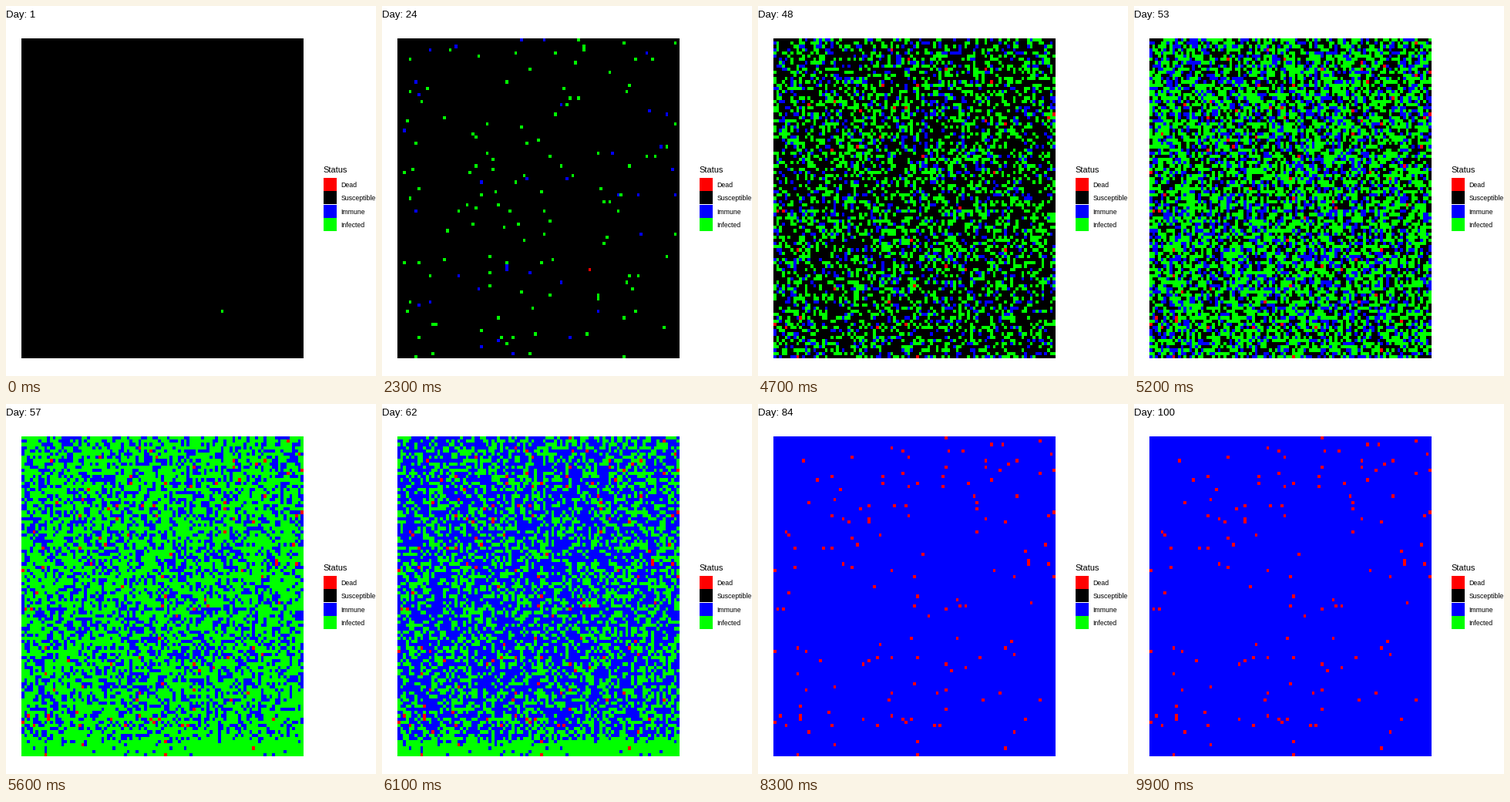
Recreate the animation shown at these times as a matplotlib script. Size 480 by 480 pixels, loop 10000 ms.

```python
import matplotlib.pyplot as plt
import numpy as np
from matplotlib.animation import FuncAnimation
from matplotlib.patches import Rectangle

N = 99              # cells per side
DAYS = 100
ILL_DAYS = 10
LAST_DAY = 57       # nobody is susceptible from here on
DEATH_RATE = 0.017
START = 84 * N + 70

SUSCEPTIBLE, INFECTED, IMMUNE, DEAD = range(4)
COLORS = np.array([(0, 0, 0), (0, 255, 0), (0, 0, 255), (255, 0, 0)], np.uint8)

rng = np.random.default_rng(7)


def total_cases():
    """Cases so far on each day: exponential growth between a few days."""
    days = np.arange(1, LAST_DAY + 1)
    knots = [1, 14, 24, 30, 38, 48, LAST_DAY]
    totals = [1, 36, 154, 430, 1150, 3950, N * N]
    return np.round(np.exp(np.interp(days, knots, np.log(totals))))


def epidemic():
    """Day of infection and day of death for every cell."""
    order = rng.permutation(N * N)
    order = np.append(START, order[order != START])
    infected = np.empty(N * N, int)
    infected[order] = np.searchsorted(total_cases(), np.arange(1, N * N + 1)) + 1

    dies = rng.random(N * N) < DEATH_RATE
    dies[START] = False
    lag = rng.integers(1, 7, N * N)
    died = np.where(dies, infected + lag, DAYS + 1)
    return infected.reshape(N, N), died.reshape(N, N)


infected, died = epidemic()

# a second wave hits the bottom rows on the last day of infections
chance = np.interp(np.arange(N), [92, 95], [0, 0.9])
relapsed = rng.random((N, N)) < chance[:, None]


def grid(day):
    state = np.full((N, N), SUSCEPTIBLE)
    state[day >= infected] = INFECTED
    state[day >= infected + ILL_DAYS] = IMMUNE
    if LAST_DAY <= day < LAST_DAY + ILL_DAYS:
        state[relapsed] = INFECTED
    state[day >= died] = DEAD
    return COLORS[state]


plt.rcParams["font.family"] = "Liberation Sans"
fig = plt.figure(figsize=(6, 6), dpi=80, facecolor="white")
ax = fig.add_axes([0, 0, 1, 1])


def label(x, y, text, px):
    return ax.text(x, y, text, fontsize=px * 72 / 80, color="black",
                   ha="left", va="baseline")


image = ax.imshow(grid(1), extent=(20, 386, 457, 42), interpolation="nearest",
                  aspect="auto")
title = label(0, 15, "Day: 1", 13.2)

label(411.4, 216, "Status", 11)
LEGEND = [("Dead", DEAD, 223), ("Susceptible", SUSCEPTIBLE, 240),
          ("Immune", IMMUNE, 258), ("Infected", INFECTED, 275)]
for name, state, top in LEGEND:
    ax.add_patch(Rectangle((412, top), 17, 17, lw=0, antialiased=False,
                           facecolor=COLORS[state] / 255))
    label(434.2, top + 12, name, 8.8)

ax.set_xlim(0, 480)
ax.set_ylim(480, 0)
ax.axis("off")


def update(i):
    image.set_data(grid(i + 1))
    title.set_text(f"Day: {i + 1}")
    return image, title


anim = FuncAnimation(fig, update, frames=DAYS, interval=100, repeat=True,
                     repeat_delay=0)
plt.show()
```
